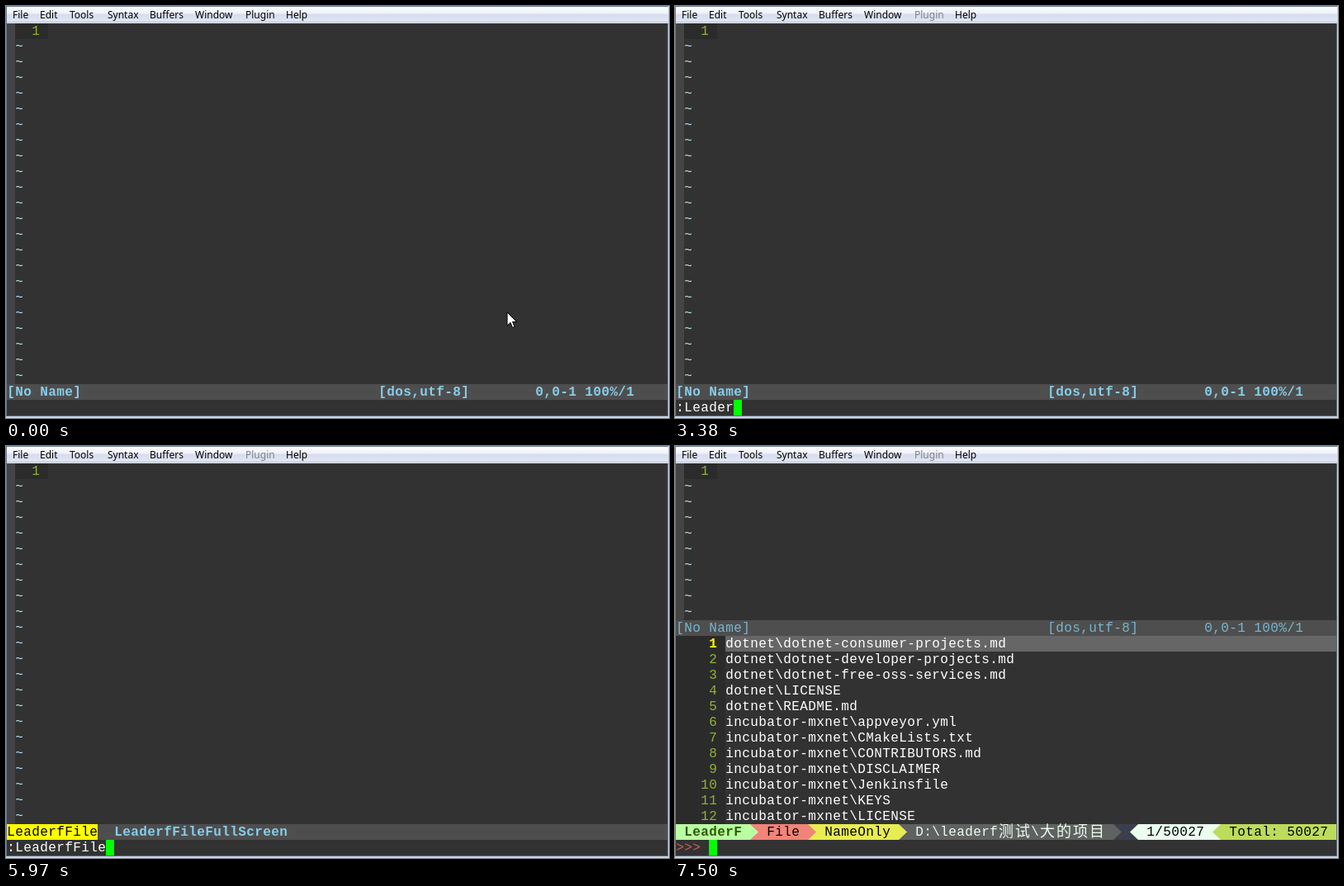
An HTML page with a canvas that plays this animation: 803 by 499 pixels, repeating every 8000 ms.

```html
<!DOCTYPE html>
<html lang="en">
<head>
<meta charset="utf-8">
<title>Fuzzy file search in an editor</title>
<style>
  html, body { margin: 0; width: 100%; height: 100%; overflow: hidden; background: #323232; }
  canvas { display: block; }
</style>
</head>
<body>
<canvas id="stage" width="803" height="499"></canvas>
<script>
const ctx = document.getElementById('stage').getContext('2d', { alpha: false });
const LOOP = 8000, CELL = 10, LINE = 19, LEFT = 1, TOP = 21;
const STATUS_ROW = 23, PROMPT_ROW = 24;
const BG = '#323232', GUTTER = '#2b2b2b', FOLD = '#444444', BAR = '#4e4e4e';
const SKY = '#87ceeb', OLIVE = '#8fb338', WHITE = '#ffffff', BLACK = '#000000';

const MENU = [['File', 8], ['Edit', 41], ['Tools', 77], ['Syntax', 123],
  ['Buffers', 174], ['Window', 229], ['Plugin', 290], ['Help', 339]];

const FILES = ['dotnet\\dotnet-consumer-projects.md', 'dotnet\\dotnet-developer-projects.md',
  'dotnet\\dotnet-free-oss-services.md', 'dotnet\\LICENSE', 'dotnet\\README.md',
  ...['appveyor.yml', 'CMakeLists.txt', 'CONTRIBUTORS.md', 'DISCLAIMER', 'Jenkinsfile',
    'KEYS', 'LICENSE'].map(name => 'incubator-mxnet\\' + name)];

const COMMAND = ':LeaderfFile';
const KEYS = [1160, 1960, 2270, 2570, 2860, 3130, 3380, 3790, 4560, 4710];
const COMPLETE = 4960, SEARCH = 6400, RESULTS = 6550;
const CURSOR_OFF = [[0, 270], [740, 880], [1840, 1960], [4410, 4560],
  [5670, 5970], [6250, RESULTS], [6950, 7500]];

const cellX = col => LEFT + col * CELL;
const rowY = row => TOP + row * LINE;

function rect(x, y, w, h, color) {
  ctx.fillStyle = color;
  ctx.fillRect(x, y, w, h);
}

function cells(row, col, count, color) {
  rect(cellX(col), rowY(row), count * CELL, LINE, color);
}

function shape(points, fill) {
  ctx.beginPath();
  points.forEach(([x, y]) => ctx.lineTo(x, y));
  ctx.closePath();
  ctx.fillStyle = fill;
  ctx.fill();
}

// Places text on the character grid; CJK characters take two cells.
function put(row, col, text, color, weight = 'normal') {
  ctx.fillStyle = color;
  for (const char of text) {
    const wide = char > '\u2e80';
    ctx.font = wide ? '18px "Noto Sans CJK SC", "Noto Sans CJK", sans-serif'
      : `${weight} 16px "Liberation Mono", monospace`;
    ctx.fillText(char, cellX(col) + (wide ? 1 : 0.2), rowY(row) + (wide ? 15 : 14));
    col += wide ? 2 : 1;
  }
}

function drawMenu(pluginEnabled) {
  const gradient = ctx.createLinearGradient(0, 1, 0, 20);
  gradient.addColorStop(0, '#ffffff');
  gradient.addColorStop(0.42, '#eef1f9');
  gradient.addColorStop(0.48, '#d6ddee');
  gradient.addColorStop(1, '#e1e7f6');
  rect(0, 0, 803, 20, gradient);
  rect(0, 19, 803, 1, '#b9c2d4');
  rect(0, 20, 803, 1, '#f0f0f0');
  ctx.font = '12px "Noto Sans", sans-serif';
  for (const [label, x] of MENU) {
    ctx.fillStyle = label === 'Plugin' && !pluginEnabled ? '#7d8088' : BLACK;
    ctx.fillText(label, x, 15);
  }
}

function drawFrame() {
  rect(0, 0, 803, 1, '#66788f');
  rect(0, 0, 1, 499, '#66788f');
  rect(801, 21, 1, 476, '#5c6b7c');
  rect(802, 0, 1, 499, '#c3d5e8');
  rect(0, 496, 802, 1, '#5c6b7c');
  rect(0, 497, 803, 2, '#c3d9ec');
}

function drawBuffer(rows) {
  rect(LEFT, TOP, CELL, rows * LINE, FOLD);
  cells(0, 1, 4, GUTTER);
  put(0, 3, '1', OLIVE);
  for (let row = 1; row < rows; row++) put(row, 1, '~', '#b4e2f5');
}

function drawStatus(row, color, weight) {
  cells(row, 0, 80, BAR);
  put(row, 0, '[No Name]', color, weight);
  put(row, 45, '[dos,utf-8]', color, weight);
  put(row, 64, '0,0-1 100%/1', color, weight);
}

function drawWildMenu() {
  cells(STATUS_ROW, 0, 80, BAR);
  cells(STATUS_ROW, 0, 11, '#ffff00');
  put(STATUS_ROW, 0, 'LeaderfFile', BLACK);
  put(STATUS_ROW, 13, 'LeaderfFileFullScreen', SKY, 'bold');
}

function arrow(col, direction, color, back) {
  const y = rowY(STATUS_ROW), x = cellX(col);
  const base = direction > 0 ? x : x + CELL;
  cells(STATUS_ROW, col, 1, back);
  shape([[base, y], [base + direction * CELL, y + LINE / 2], [base, y + LINE]], color);
}

function segment(col, count, text, back, color = BLACK, weight) {
  cells(STATUS_ROW, col, count, back);
  put(STATUS_ROW, col + 1, text, color, weight);
}

function drawResults() {
  FILES.forEach((name, i) => {
    const row = 11 + i, number = String(i + 1);
    cells(row, 0, 6, GUTTER);
    if (!i) cells(row, 6, 74, '#666666');
    put(row, 5 - number.length, number, i ? OLIVE : '#ffff00', i ? 'normal' : 'bold');
    put(row, 6, name, WHITE);
  });

  const green = '#baffa3', red = '#f28379', yellow = '#e8ed51', gray = '#606161';
  const blank = '#3b3e4c', pale = '#ebffef', lime = '#bcdc5c';
  segment(0, 9, 'LeaderF', green, '#2f5c00', 'bold');
  arrow(9, 1, green, red);
  segment(10, 6, 'File', red);
  arrow(16, 1, red, yellow);
  segment(17, 10, 'NameOnly', yellow);
  arrow(27, 1, yellow, gray);
  segment(28, 25, 'D:\\leaderf测试\\大的项目', gray, pale);
  arrow(53, 1, gray, blank);
  cells(STATUS_ROW, 54, 1, blank);
  arrow(55, -1, pale, blank);
  segment(56, 9, '1/50027', pale);
  arrow(65, -1, lime, pale);
  segment(66, 14, 'Total: 50027', lime);
  put(PROMPT_ROW, 0, '>>>', '#cd5c5c');
}

function drawPointer() {
  const outline = [[0, 0], [0, 16], [4, 12.5], [6.5, 18.5], [9, 17.5], [6.5, 11.5], [11.5, 11.5]]
    .map(([x, y]) => [607 + x, 371 + y]);
  shape(outline, WHITE);
  ctx.strokeStyle = BLACK;
  ctx.lineWidth = 1;
  ctx.stroke();
}

function draw(time) {
  const typing = time >= KEYS[0], results = time >= RESULTS;
  const completed = time >= COMPLETE && time < SEARCH;
  const typed = COMMAND.slice(0, completed ? COMMAND.length : KEYS.filter(key => time >= key).length);

  rect(0, 0, 803, 499, BG);
  drawMenu(!typing);
  drawBuffer(results ? 10 : STATUS_ROW);
  if (results) {
    drawStatus(10, '#78b6d0', 'normal');
    drawResults();
  } else if (completed) {
    drawWildMenu();
  } else {
    drawStatus(STATUS_ROW, SKY, 'bold');
  }
  if (typing && time < SEARCH) put(PROMPT_ROW, 0, typed, WHITE);
  if (time >= SEARCH && !results) put(PROMPT_ROW, 1, 'searching ...', '#ee0000');

  if (!CURSOR_OFF.some(([from, to]) => time >= from && time < to)) {
    const col = results ? 4 : typing ? typed.length : 5;
    cells(typing ? PROMPT_ROW : 0, col, 1, '#00ff00');
  }
  drawFrame();
  if (!typing) drawPointer();
}

function tick() {
  draw(performance.now() % LOOP);
  requestAnimationFrame(tick);
}
tick();
</script>
</body>
</html>
```
